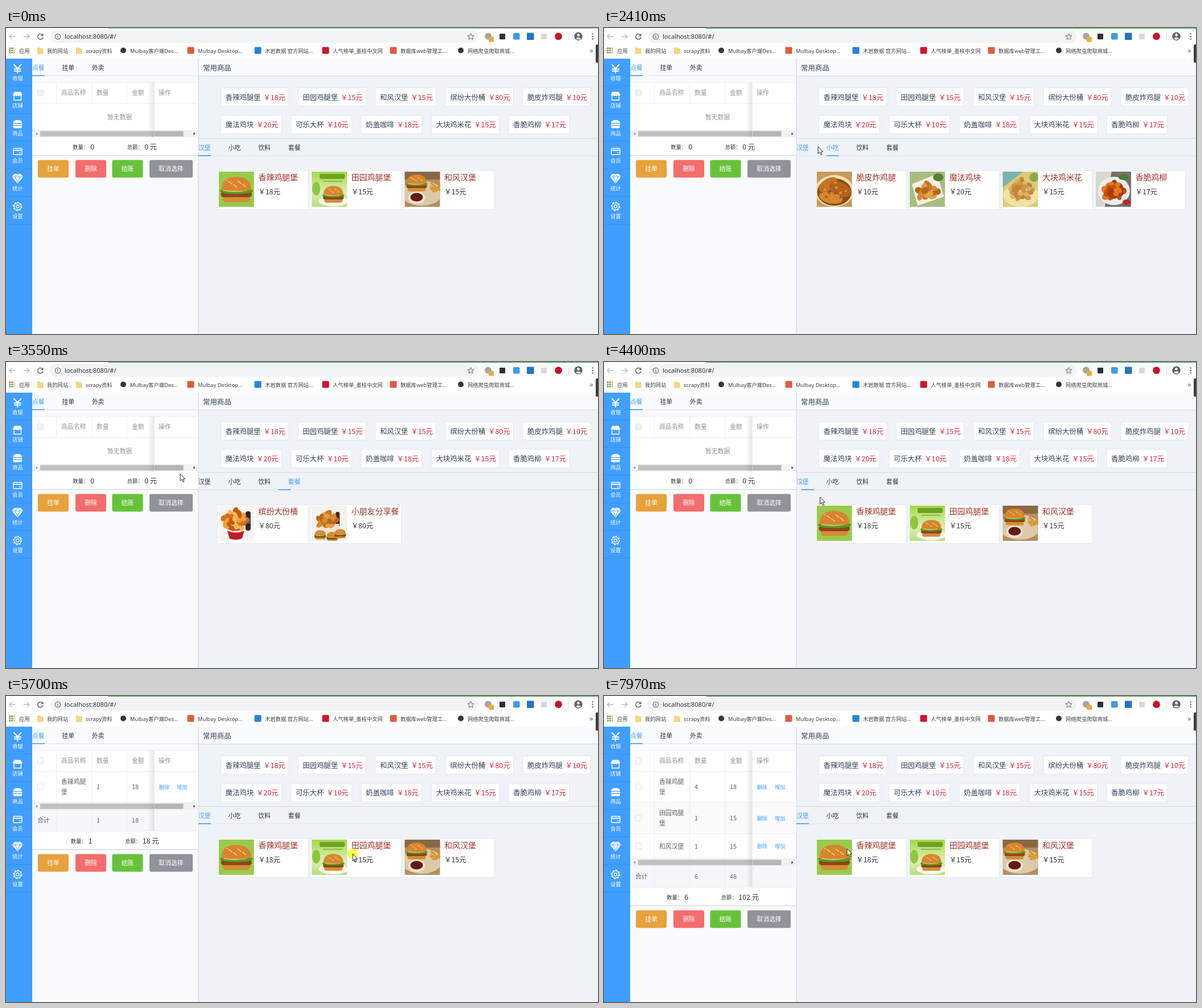
An HTML page for the animation above (8 s loop, 1040 by 539 pixels).

```html
<!DOCTYPE html>
<html lang="zh-CN">
<head>
<meta charset="utf-8">
<title>点餐</title>
<style>
html, body { margin: 0; width: 100%; height: 100%; overflow: hidden; background: #fff; }
svg { display: block; }
text { font-family: "Noto Sans CJK SC", "Noto Sans CJK", sans-serif; white-space: pre; }
.ui { font-family: "Noto Sans", "Noto Sans CJK SC", sans-serif; }
</style>
</head>
<body>
<svg id="stage" width="1040" height="539" viewBox="0 0 1040 539">
  <defs>
    <linearGradient id="shade"><stop offset="0" stop-opacity="0"/><stop offset="1" stop-opacity=".09"/></linearGradient>
    <linearGradient id="leaf" x2="0" y2="1"><stop offset="0" stop-color="#a4d848"/><stop offset=".6" stop-color="#dcefb4"/><stop offset="1" stop-color="#b9dd7a"/></linearGradient>
  </defs>
  <g id="base"></g>
  <g id="order"></g>
  <g id="menu"></g>
  <g id="tabs"></g>
  <rect id="bar" y="224" width="22" height="1.6" fill="#409eff"/>
  <rect id="topline" x="179" y="0" width="861" height="1" fill="#2f9a3a"/>
  <circle id="press" r="9.5" fill="#ffff3c" fill-opacity=".88"/>
  <path id="cursor" d="M0 0V12.4L2.9 9.7 5 14.4 7 13.5 5 9H8.8Z" fill="#fff" stroke="#111" stroke-width=".9" stroke-linejoin="round"/>
</svg>
<script>
const LOOP = 8000, BLUE = '#409eff', INK = '#303133', GREY = '#909399', BODY = '#606266', LINE = '#ebeef5', EDGE = '#c6d0de';
const $ = id => document.getElementById(id);

const rect = (x, y, w, h, fill, more = '') => `<rect x="${x}" y="${y}" width="${w}" height="${h}" fill="${fill}" ${more}/>`;
const oval = (x, y, rx, ry, fill, more = '') => `<ellipse cx="${x}" cy="${y}" rx="${rx}" ry="${ry}" fill="${fill}" ${more}/>`;
const path = (d, fill, stroke = 'none', w = 1) => `<path d="${d}" fill="${fill}" stroke="${stroke}" stroke-width="${w}"/>`;
// y is the vertical middle of the glyphs
const text = (x, y, size, fill, s, more = '') =>
  `<text x="${x}" y="${(y + size * .38).toFixed(2)}" font-size="${size}" fill="${fill}" ${more}>${s}</text>`;
const mid = (x, y, size, fill, s, more = '') => text(x, y, size, fill, s, 'text-anchor="middle" ' + more);

/* ---------- browser frame ---------- */
function chrome() {
  const dark = '#5f6368', ui = 'class="ui"';
  let s = rect(0, 0, 1040, 54, '#fff') + rect(77, 4, 753, 22, '#f1f3f4', 'rx="11"');
  s += path('M16 15H6M10.5 10.5L6 15l4.5 4.5M31 15H41M36.500 10.500L41 15l-4.500 4.500', 'none', '#b9bbbe', 1.4);
  s += path('M64 12.200A4.700 4.700 0 1 0 65 16', 'none', dark, 1.5) + path('M65.500 9.500v4.700h-4.700z', dark);
  s += oval(91, 15, 4.8, 4.8, 'none', `stroke="${dark}" stroke-width="1.1"`) + path('M91 14.300v3.500M91 12v1.200', 'none', dark, 1.2);
  s += text(103, 14.7, 11.1, '#303236', 'localhost:8080/#/', ui);
  s += path('M816.500 9.500l1.600 3.700 4 .3-3 2.700.9 4-3.500-2.100-3.500 2.100.9-4-3-2.700 4-.3z', 'none', dark);
  s += oval(847, 14.5, 6, 6, '#a9a49c') + rect(848, 15.500, 9, 9, '#e6ae3c', 'rx="1.5"');
  s += rect(867, 10, 10, 10, '#2c3036', 'rx="1"') + rect(891, 9, 11.5, 11.500, '#3d9be0', 'rx="2"');
  s += rect(915, 8.5, 12.5, 12.500, '#2476bd', 'rx="1"') + rect(940, 10, 10, 10, '#d9d9d9', 'rx="1"');
  s += oval(970.5, 14.7, 6.4, 6.4, '#c8102a') + rect(988, 8, 1, 14, '#dadce0');
  s += oval(1005.5, 14.7, 7.2, 7.2, dark) + oval(1005.5, 12.4, 2.3, 2.3, '#fff') + path('M1001 18.500q4.500-4 9 0q-4.500 3.800-9 0', '#fff');
  for (const y of [10.5, 15, 19.5]) s += oval(1030.5, y, 1.2, 1.2, dark);
  const dots = ['#e0443a', '#e0443a', '#f0b429', '#36a352', '#4285f4', '#f0b429', '#36a352', '#36a352', '#f0b429'];
  dots.forEach((c, i) => s += rect(5.5 + i % 3 * 3.8, 34.5 + (i / 3 | 0) * 3.8, 2.6, 2.6, c));
  s += text(23, 40, 9.3, '#3c4043', '应用', ui);
  const marks = [
    [72, '我的网站'], [140, 'scrapy资料'], [218, 'Mulbay客户端Des...', '#33363a', 1], [337, 'Mulbay Desktop...', '#e05a40'],
    [455, '木岩数据 官方网站...', '#2584d8'], [574, '人气榜单_墨枝中文网', '#d0142c'],
    [693, '数据库web管理工...', '#e05a40'], [811, '网络爬虫爬取商城...', '#33363a', 1]];
  for (const [x, label, color, round] of marks) {
    if (!color) s += path(`M${x - 16.500} 35h4l1.200 1.300h4.300v9h-9.500z`, '#f6d57c', '#e8c05a', .6);
    else if (round) s += oval(x - 12, 39.500, 5, 5, color);
    else s += rect(x - 18.500, 33.500, 12, 12, color, 'rx="1.5"');
    s += text(x, 40, 9.3, '#3c4043', label, ui);
  }
  return s + text(1025, 39, 13, dark, '»', ui);
}

/* ---------- fixed page parts ---------- */
function sidebar() {
  let s = rect(0, 54, 46, 485, BLUE);
  ['收银', '店铺', '商品', '会员', '统计', '设置'].forEach((name, i) => {
    s += mid(20.5, 88 + 48.6 * i, 9.3, '#fff', name) + rect(0, 101.500 + 48.700 * i, 46, 1, '#3a8fe8');
  });
  s += path('M13.500 64l6.700 7.500L27 64M20.200 71.500V80M14 72.300h12.500M14 75.800h12.500', 'none', '#fff', 1.9);
  s += path('M14.500 112.500h11.500l2.500 5.500q-1.500 3-4 1q-2 2-4.200 0q-2.300 2-4.300 0q-2.500 2-4-1z', '#fff') + path('M14 120v7h12.500v-7', 'none', '#fff', 1.5);
  s += path('M12.500 167.500q0-5.500 7.800-5.500t7.800 5.500z', '#fff') + rect(12, 168.8, 16.500, 2.4, '#fff') + path('M12.500 172.500h15.500v2q0 2-2 2h-11.500q-2 0-2-2z', '#fff');
  s += rect(13, 212, 15, 11, 'none', 'rx="1" stroke="#fff" stroke-width="1.4"') + rect(13, 214.500, 15, 2, '#fff') + rect(23, 219, 3, 1.300, '#fff');
  s += path('M14.500 257h11.500l4 5.200-9.700 11.800-9.800-11.800z', '#fff') + path('M10.500 262.300h19.500M16 262.300l4.300 10 4.300-10M16 262l4.300-4.500 4.300 4.500', 'none', BLUE, .9);
  s += oval(20.300, 314.3, 6.200, 6.200, 'none', 'stroke="#fff" stroke-width="1.3"') + oval(20.300, 314.3, 7.300, 7.300, 'none', 'stroke="#fff" stroke-width="1.8" stroke-dasharray="2.6 3.13"');
  return s + oval(20.300, 314.3, 2.700, 2.700, 'none', 'stroke="#fff" stroke-width="1.2"');
}

function favourites() {
  const rows = [
    [377, 105, '香辣鸡腿堡 18', '田园鸡腿堡 15', '和风汉堡 15', '缤纷大份桶 80', '脆皮炸鸡腿 10'],
    [377, 153.7, '魔法鸡块 20', '可乐大杯 10', '奶盖咖啡 18', '大块鸡米花 15', '香脆鸡柳 17']];
  let s = '';
  for (let [x, y, ...items] of rows) for (const item of items) {
    const [name, price] = item.split(' '), nameW = name.length * 12.4, w = nameW + 58;
    s += rect(x + .5, y + .5, w - 1, 32, '#fff', 'stroke="#e3e8f0"');
    s += text(x + 8.5, y + 17, 12.4, '#324057', name) + text(x + 13.3 + nameW, y + 17, 12.4, '#dc1f3c', `￥${price}元`);
    x += w + 15.7;
  }
  return s;
}

function basePage() {
  let s = chrome() + rect(0, 54, 1040, 485, '#eff2f7') + rect(46, 54, 292, 485, '#f9fafc') + sidebar();
  s += rect(338, 54, 702, 30, '#f9fafc') + rect(338, 84, 702, 1, '#d3dce6') + rect(337.500, 54, 1, 485, EDGE);
  s += rect(46, 83.5, 292, 1.2, '#e1e5ec') + rect(46, 83, 22, 1.600, BLUE);
  ['点餐', '挂单', '外卖'].forEach((n, i) => s += text(46 + 52.5 * i, 70, 10.85, i ? INK : BLUE, n));
  s += text(346, 70.500, 12.4, '#324057', '常用商品') + favourites();
  s += rect(338, 194, 702, 1, '#d0d9e5') + rect(338, 224.500, 702, 1, '#dde3ec');
  return s + rect(1036, 29, 6, 32, '#3b3b3d', 'rx="2"');
}

/* ---------- order table ---------- */
const ROWS = [['香辣鸡腿', '堡', 18, 55], ['田园鸡腿', '堡', 15, 55], ['和风汉堡', '', 15, 44]];
const COLS = [88, 150, 212];

function orderPanel(count, extra, ready) {
  const end = count ? 133 + ROWS.slice(0, count).reduce((a, r) => a + r[3], 0) : 180;
  const bottom = count ? end + 50 : end + 13, sumY = count ? end + 67 : end + 29;
  const cell = (x, y, v) => text(x, y, 10.85, BODY, v);
  const box = (y, on) => rect(55.5, y - 5, 10, 10, on ? '#fff' : '#edf2fc', 'rx="1.5" stroke="#dcdfe6"');
  let s = rect(46, 96, 291.500, sumY + 15 - 96, '#fff'), y = 133, pieces = 0, money = 0, total = 0;
  for (let i = 0; i < count; i++) {
    const [a, b, price, h] = ROWS[i], m = y + h / 2 - .5, n = i ? 1 : 1 + extra;
    if (i === 1) s += rect(46, y, 291.500, h, '#fafafa');
    s += box(m, true) + cell(97, b ? m - 9 : m, a) + cell(97, m + 9, b) + cell(159, m, n) + cell(221, m, price);
    s += text(268.5, m + .3, 9.3, BLUE, '删除') + text(300, m + .3, 9.3, BLUE, '增加') + rect(46, y + h - 1, 291.500, 1, LINE);
    y += h; pieces += n; money += price; total += n * price;
  }
  if (count) {
    s += rect(46, end + 12.5, 291.500, 37.500, '#f5f7fa') + rect(46, end + 49.500, 291.500, 1, LINE);
    s += cell(55, end + 31, '合计') + cell(159, end + 31, pieces) + cell(221, end + 31, money);
  } else s += mid(199.700, 156.5, 10.85, GREY, '暂无数据');
  s += box(114, ready);
  ['商品名称', '数量', '金额', '操作'].forEach((n, i) => s += text([97, 159, 221, 268][i], 114, 10.85, GREY, n, 'font-weight="500"'));
  for (const x of COLS) s += rect(x, 96, 1, (count ? bottom : 133) - 96, LINE);
  s += rect(46, 95.500, 291.500, 1, LINE) + rect(46, 132.500, 291.500, 1, LINE);
  s += rect(46, end, 291.500, 12.5, '#f1f1f1') + rect(60, end + 1.500, 251.500, 9.500, '#c1c1c1');
  s += path(`M55 ${end + 3.800}v5l-3-2.500z`, '#8f8f8f') + path(`M329.500 ${end + 3.800}v5l3-2.500z`, '#404040');
  s += rect(249, 96, 11, bottom - 96, 'url(#shade)') + rect(260, 96, .8, bottom - 96, '#e6e9ef') + rect(260, end + 1.500, 51.500, 9.500, '#000', 'fill-opacity=".06"');
  const sx = 117.2 - 3.45 * (String(total).length - 1);
  s += text(sx, sumY + .5, 9.3, INK, '数量：') + text(sx + 31, sumY, 12.4, INK, pieces);
  s += text(sx + 95.5, sumY + .5, 9.3, INK, '总额：') + text(sx + 126, sumY, 12.4, INK, total + ' 元');
  s += rect(46, sumY + 15, 291.500, 1, EDGE);
  const buttons = [[56, 54, '#e6a23c', '挂单'], [122, 54, '#f56c6c', '删除'], [186.5, 54, '#67c23a', '结账'], [252, 76, '#909399', '取消选择']];
  for (const [x, w, c, n] of buttons)
    s += rect(x, sumY + 23.600, w, 31, c, 'rx="3"') + mid(x + w / 2, sumY + 39, 10.85, '#fff', n, 'font-weight="500"');
  return s;
}

/* ---------- food pictures, 62 by 62 ---------- */
function burger(x, y, k) {
  let s = rect(-22, 8, 44, 11, '#d68c36', 'rx="5"') + rect(-25, 2, 50, 9, '#8d4717', 'rx="4"');
  s += oval(0, 1, 27, 5, '#5c9a22') + oval(-2, -1, 20, 3.5, '#f1e6c4') + path('M-24-1Q-24-22 0-22T24-1Q0 4-24-1z', '#d9852c');
  for (let i = 0; i < 13; i++) s += oval(-15 + i * 7.3 % 31, -16 + i * 5.1 % 11, 1.2, .8, '#f6dba0');
  return `<g transform="translate(${x} ${y}) scale(${k})">${s}</g>`;
}
function pile(seed, n, x, y, w, h, r, colors) {
  const rnd = () => (seed = seed * 16807 % 2147483647) / 2147483647;
  let s = '';
  for (let i = 0; i < n; i++) {
    const a = i * 2.4, d = Math.sqrt(1 - i / n), px = x + Math.cos(a) * w * d, py = y + Math.sin(a) * h * d;
    s += oval(px, py, r * (.8 + rnd() * .5), r * (.6 + rnd() * .3), colors[i % colors.length], `transform="rotate(${rnd() * 180 | 0} ${px} ${py})"`);
  }
  return s;
}
const FRIED = ['#b8651c', '#d98a30', '#c67622', '#e3a04a'], GOLD = ['#cf9646', '#e0b06a', '#c28536'], SPICY = ['#c9500f', '#e47a1c', '#a83d0c'];
const fill = c => rect(0, 0, 62, 62, c);
const tub = (x, y, c) => path(`M${x - 16} ${y}h32l-5 18q-11 4-22 0z`, c) + path(`M${x - 16} ${y}q16 8 32 0v4q-16 7-32 0z`, '#f4e6da');
const PHOTOS = {
  spicy: () => fill('#98cb4c') + burger(31, 33, 1.08),
  farm: () => fill('url(#leaf)') + rect(14, 4, 44, 9, '#6fa321', 'rx="3"') + rect(20, 16, 34, 2, '#8ab84a') + oval(8, 30, 7, 12, '#8cc63f') + oval(38, 52, 26, 9, '#f7f8ee') + burger(38, 41, .72),
  style: () => fill('#b58e5e') + rect(0, 0, 62, 14, '#8a6844') + oval(30, 38, 36, 22, '#dcc9a8') + burger(21, 21, .72) +
    [0, 1, 2, 3, 4, 5, 6].map(i => rect(40 + i * 2, 22 + i * 3, 21, 3.2, i % 2 ? '#e0ad45' : '#cf9230', `transform="rotate(${40 - i * 17} ${48} ${30 + i})"`)).join('') +
    oval(21, 46, 15, 11, '#eee2cf') + oval(21, 45, 11, 7.5, '#611c14'),
  leg: () => fill('#c79a58') + oval(31, 34, 34, 28, '#f0ddb0') + oval(31, 36, 30, 24, '#8a4c17') + oval(20, 23, 18, 10, '#c57324', 'transform="rotate(-35 20 23)"') +
    oval(41, 31, 20, 12, '#b8611a', 'transform="rotate(25 41 31)"') + oval(25, 46, 21, 10, '#d48631', 'transform="rotate(12 25 46)"') + pile(9, 12, 31, 34, 20, 16, 2.4, ['#dc9545', '#a65414']),
  nugget: () => fill('#a9bd83') + path('M4 22L48 4 60 44 14 60z', '#f3f1e6') + oval(50, 10, 9, 7, '#55822d') + pile(21, 13, 31, 35, 18, 13, 7, FRIED),
  popcorn: () => fill('#dcca75') + path('M0 0H36L0 28z', '#78b4b0') + oval(32, 42, 31, 20, '#efe2a2') + oval(55, 10, 8, 8, '#8aa84a') + pile(33, 22, 32, 32, 20, 18, 5.5, GOLD),
  strip: () => fill('#77716b') + path('M0 0H28L16 62H0z', '#d8d6cf') + oval(32, 34, 28, 25, '#e9eef0') + oval(49, 10, 9, 5, '#4e7b35') + oval(54, 54, 7, 5, '#b9282a') + pile(45, 18, 31, 34, 18, 15, 6.5, SPICY),
  cola: () => fill('#f4f1ee') + path('M19 16h24l-4 40H23z', '#7c2418') + rect(17, 12, 28, 5, '#e8e8e8', 'rx="2"') + rect(33, 2, 2.5, 11, '#cf3030'),
  coffee: () => fill('#efe6da') + path('M18 24h26l-4 33H22z', '#7d5233') + oval(31, 23, 14, 8, '#fff8ec') + oval(31, 15, 8, 6, '#fff8ec'),
  bucket: () => fill('#f5f4f2') + rect(47, 10, 9, 34, '#3a1f1a', 'rx="4"') + rect(47, 22, 9, 10, '#3157a0') + tub(30, 40, '#b81f24') + pile(51, 24, 28, 25, 21, 17, 6, ['#d56c17', '#eda23a', '#c65b12', '#f0b758']),
  family: () => fill('#f4f2ee') + rect(42, 11, 7, 26, '#4a241b', 'rx="3"') + tub(32, 32, '#efe3d6') + pile(63, 18, 27, 25, 17, 12, 6, FRIED) + burger(15, 52, .4) + burger(36, 55, .4) + burger(50, 50, .4)
};
const MENU = [
  [['香辣鸡腿堡', 18, 'spicy'], ['田园鸡腿堡', 15, 'farm'], ['和风汉堡', 15, 'style']],
  [['脆皮炸鸡腿', 10, 'leg'], ['魔法鸡块', 20, 'nugget'], ['大块鸡米花', 15, 'popcorn'], ['香脆鸡柳', 17, 'strip']],
  [['可乐大杯', 10, 'cola'], ['奶盖咖啡', 18, 'coffee']],
  [['缤纷大份桶', 80, 'bucket'], ['小朋友分享餐', 80, 'family']]];
const cards = tab => MENU[tab].map(([name, price, photo], i) => {
  const x = 371.5 + 163.4 * i;
  return rect(x, 251.5, 159.500, 68, '#fff', 'stroke="#e5eaf2"') + `<svg x="${x + 2}" y="253" width="62.300" height="62" viewBox="0 0 62 62" preserveAspectRatio="none">${PHOTOS[photo]()}</svg>` +
    text(x + 71.800, 263, 13.95, '#a23028', name) + text(x + 71.800, 288, 12.4, INK, `￥${price}元`);
}).join('');

/* ---------- timeline ---------- */
const PATH = [[70, 877, 484], [840, 398, 230], [1180, 398, 230], [1440, 397, 220], [1920, 395, 215], [2180, 350, 206], [2300, 358, 207], [2410, 376, 209],
  [2740, 452, 212], [2880, 453, 212], [3170, 503, 213], [3440, 498, 212], [3550, 306, 197], [3720, 274, 192], [4070, 350, 213], [4173, 352, 214],
  [4400, 379.5, 238], [4740, 408, 276], [5010, 410, 276], [5560, 609, 278], [5790, 609, 278], [5930, 748, 283], [6240, 748, 283],
  [6560, 417, 276], [6840, 425, 270], [7740, 426, 270], [7970, 427, 269]];
const PRESSES = [[990, 1070], [1470, 1770], [2780, 2860], [3310, 3382], [4090, 4173], [4780, 4860], [5640, 5780], [6160, 6240], [6870, 6950], [7430, 7500], [7740, 7820]];
const SWITCHES = [[-999, 0], [1920, 1], [2860, 2], [3382, 3], [4173, 0]];
const ADDS = [4860, 5780, 6240], MORE = [6950, 7500, 7820];
const tabX = i => 338 + 52.6 * i;
const passed = (list, t) => list.filter(v => v <= t).length;
const inOut = u => u < .5 ? 4 * u ** 3 : 1 - (2 - 2 * u) ** 3 / 2;

function pointer(t) {
  const i = PATH.findIndex(p => p[0] > t);
  if (i < 1) return (i ? PATH[PATH.length - 1] : PATH[0]).slice(1);
  const [t0, x0, y0] = PATH[i - 1], [t1, x1, y1] = PATH[i], u = (t - t0) / (t1 - t0), e = u * u * (3 - 2 * u);
  return [x0 + (x1 - x0) * e, y0 + (y1 - y0) * e];
}

const shown = {};
function put(id, key, make) {
  if (shown[id] === key) return;
  shown[id] = key;
  $(id).innerHTML = make();
}

function draw(t) {
  const n = passed(SWITCHES.map(v => v[0]), t) - 1, [start, tab] = SWITCHES[n], from = n ? SWITCHES[n - 1][1] : 0;
  const count = passed(ADDS, t), extra = passed(MORE, t), ready = t >= 5010;
  const [x, y] = pointer(t), [hx, hy] = pointer(t - 120);
  const hover = hy > 194 && hy < 232 ? Math.floor((hx - 322.5) / 52.6) : -1;
  put('order', `${count} ${extra} ${ready}`, () => orderPanel(count, extra, ready));
  put('menu', tab, () => cards(tab));
  put('tabs', `${tab} ${hover}`, () => ['汉堡', '小吃', '饮料', '套餐'].map((s, i) =>
    text(tabX(i), 211, 10.85, i === tab || i === hover ? BLUE : INK, s)).join(''));
  const u = inOut(Math.min(1, (t - start) / 300));
  $('bar').setAttribute('x', tabX(from) + (tabX(tab) - tabX(from)) * u);
  $('topline').setAttribute('fill-opacity', t < 1770 ? .6 : 1);
  $('cursor').setAttribute('transform', `translate(${x.toFixed(1)} ${y.toFixed(1)})`);
  $('cursor').setAttribute('visibility', t < 70 ? 'hidden' : 'visible');
  $('press').setAttribute('transform', `translate(${x.toFixed(1)} ${y.toFixed(1)})`);
  $('press').setAttribute('visibility', PRESSES.some(([a, b]) => t >= a && t < b) ? 'visible' : 'hidden');
}

$('base').innerHTML = basePage();
const began = performance.now();
function tick() {
  draw((performance.now() - began) % LOOP);
  requestAnimationFrame(tick);
}
tick();
</script>
</body>
</html>
```
